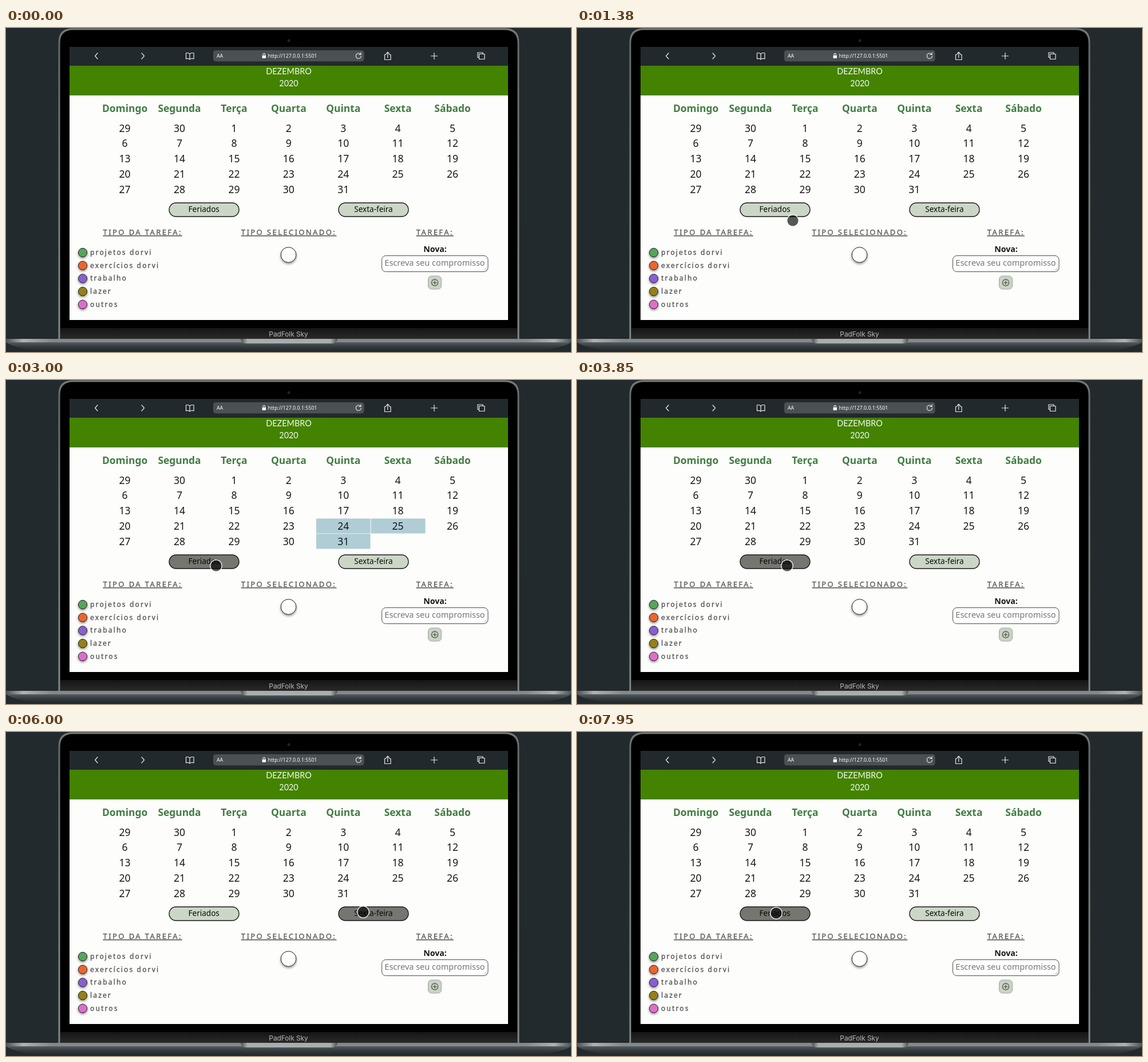
These frames come from a looping animation (987x567 px, 7.99 s). An HTML page:

```html
<!DOCTYPE html>
<html lang="pt">
<head>
<meta charset="utf-8">
<title>Calendário</title>
<style>
  html, body { margin: 0; width: 100%; height: 100%; overflow: hidden; background: #222a2d; }
  svg { display: block; width: 100%; height: 100%; font-family: "Noto Sans", "Open Sans", sans-serif; }
  text { fill: #171717; text-anchor: middle; }
  .month { font: 14.4px Lato, sans-serif; fill: #f5faef; }
  .weekday { font-size: 17.4px; font-weight: 700; fill: #417d42; }
  .day { font-size: 17.5px; }
  .label { font-size: 13.5px; fill: #080808; }
  .heading { font-size: 13px; letter-spacing: 2.4px; fill: #5c6257; stroke: #5c6257; stroke-width: .35; text-decoration: underline; }
  .task { font-size: 12px; letter-spacing: 2.15px; fill: #505050; stroke: #505050; stroke-width: .3; text-anchor: start; }
  .url { font-size: 8.8px; fill: #fff; text-anchor: start; }
  .icons { fill: none; stroke: #e8eaea; stroke-width: 1.2; stroke-linecap: round; stroke-linejoin: round; }
  .pill { stroke: #181a17; stroke-width: 1.4; }
  .shadow { filter: drop-shadow(0 2px 2px #0007); }
</style>
</head>
<body>
<svg viewBox="0 0 987 567" preserveAspectRatio="none">
  <defs>
    <linearGradient id="rim" x2="0" y2="1">
      <stop stop-color="#777b7c"/><stop offset=".05" stop-color="#666a6b"/>
      <stop offset="1" stop-color="#85898a"/>
    </linearGradient>
    <linearGradient id="chin" x2="0" y2="1">
      <stop stop-color="#151515"/><stop offset="1" stop-color="#2b2b2b"/>
    </linearGradient>
    <linearGradient id="base">
      <stop stop-color="#4d5355"/><stop offset=".03" stop-color="#aeb2b3"/>
      <stop offset=".08" stop-color="#83898b"/><stop offset=".92" stop-color="#83898b"/>
      <stop offset=".97" stop-color="#aeb2b3"/><stop offset="1" stop-color="#4d5355"/>
    </linearGradient>
    <linearGradient id="under" x2="0" y2="1">
      <stop stop-color="#555c5f"/><stop offset=".45" stop-color="#343c40"/><stop offset="1" stop-color="#20282b"/>
    </linearGradient>
    <linearGradient id="notch">
      <stop stop-color="#4a4d4f"/><stop offset=".07" stop-color="#a9adaf"/>
      <stop offset=".93" stop-color="#a9adaf"/><stop offset="1" stop-color="#4a4d4f"/>
    </linearGradient>
  </defs>

  <!-- Laptop -->
  <rect width="987" height="567" fill="#222a2d"/>
  <path d="M91.5 546V25Q91.5 .5 116 .5H872Q896.5 .5 896.5 25V546Z" fill="url(#rim)"/>
  <path d="M94.5 546V26Q94.5 3.5 117 3.5H871Q893.5 3.5 893.5 26V546Z"/>
  <rect x="95" y="525" width="798" height="20" fill="url(#chin)"/>
  <circle cx="494" cy="22" r="2.5" fill="#202225"/>
  <text x="493.5" y="539.5" font-size="11.8" style="font-family:Inter,sans-serif;fill:#b9b9b9">PadFolk Sky</text>
  <path d="M0 550H987Q972 561 920 566H67Q15 561 0 550Z" fill="url(#under)"/>
  <rect y="544" width="987" height="6" fill="url(#base)"/>
  <path d="M410 544H579Q578 552 570 552H419Q411 552 410 544Z" fill="url(#notch)"/>

  <!-- Browser bar -->
  <rect x="111" y="33" width="766" height="478" fill="#fdfdfb"/>
  <rect x="111" y="33" width="766" height="33" fill="#22292d"/>
  <rect x="362" y="39" width="263.5" height="19.5" rx="4.5" fill="#4b5053"/>
  <text class="url" x="368" y="52">AA</text>
  <text class="url" x="457.5" y="52">http://127.0.0.1:5501</text>
  <rect x="447.5" y="48" width="6.5" height="5" rx="1" fill="#fff"/>
  <g class="icons">
    <path d="M449 48V46.5a1.8 1.8 0 0 1 3.6 0V48"/>
    <path d="M160 44L155.5 49L160 54M237 44L241.5 49L237 54"/>
    <path d="M321 45.5Q318 42.5 314.5 44V54Q318 52.5 321 55Q324 52.5 328 54V44Q324 42.5 321 45.5V55"/>
    <path d="M619.5 46A4.6 4.6 0 1 0 620.5 49M620 43V46.5H616.5"/>
    <path d="M664 46.5H661.5V55.5H672V46.5H669.5M666.7 52V42.5M664 45L666.7 42.3L669.5 45"/>
    <path d="M742.5 49H753.5M748 43.5V54.5"/>
    <path d="M826 51.5H824V43H833V45M826.5 45.5H836V54.5H826.5Z"/>
  </g>

  <!-- Page -->
  <rect x="111" y="66" width="766" height="52" fill="#438300"/>
  <text class="month" x="494" y="80.5">DEZEMBRO</text>
  <text class="month" x="494" y="102">2020</text>
  <path id="holidays" fill="#b0cdd5"
    d="M542 242.5H636.5V268.5H542ZM637.5 242.5H732.5V268.5H637.5ZM542 269.3H636.5V295.5H542Z"/>
  <g id="calendar"></g>
  <rect id="holidayButton" class="pill" x="285" y="306" width="122" height="24" rx="12"/>
  <rect id="fridayButton" class="pill" x="581" y="306" width="122" height="24" rx="12"/>
  <text class="label" x="345.7" y="322">Feriados</text>
  <text class="label" x="642" y="322">Sexta-feira</text>

  <text class="heading" x="238.7" y="362">TIPO DA TAREFA:</text>
  <text class="heading" x="494" y="362">TIPO SELECIONADO:</text>
  <text class="heading" x="749.3" y="362">TAREFA:</text>
  <g id="tasks"></g>
  <circle class="shadow" cx="493.5" cy="397" r="13.3" fill="#fff" stroke="#222"/>
  <text x="749.5" y="392" font-size="14.2" font-weight="700">Nova:</text>
  <rect x="656.5" y="398.5" width="185.5" height="28" rx="7" fill="#fff" stroke="#4b4b4b"/>
  <text x="749" y="415.5" font-size="14.5" style="fill:#757575">Escreva seu compromisso</text>
  <path d="M835 424.5L840 419.5M838 424.5L840 422.5" stroke="#888" stroke-width=".8"/>
  <rect x="737.5" y="434" width="23" height="23" rx="6" fill="#cad3c5" stroke="#9da698"/>
  <g fill="none" stroke="#50564d" stroke-width="1.3">
    <circle cx="749" cy="445.6" r="5.6"/>
    <path d="M745.7 445.6H752.3M749 442.3V448.9"/>
  </g>
  <circle id="cursor" r="10.2" fill="#000" fill-opacity=".66" stroke="#fff" stroke-opacity=".82" stroke-width="1.5"/>
</svg>
<script>
const LOOP = 7990;
const byId = id => document.getElementById(id);

function add(parent, tag, attributes, content = '') {
  const node = document.createElementNS('http://www.w3.org/2000/svg', tag);
  for (const name in attributes) node.setAttribute(name, attributes[name]);
  node.textContent = content;
  parent.append(node);
  return node;
}

const columnX = column => 207.6 + 95.4 * column;
['Domingo', 'Segunda', 'Terça', 'Quarta', 'Quinta', 'Sexta', 'Sábado'].forEach((name, i) =>
  add(byId('calendar'), 'text', { class: 'weekday', x: columnX(i), y: 147 }, name));

const fridays = [];
for (let i = 0; i < 33; i++) {
  const day = i < 2 ? 29 + i : i - 1;
  const cell = add(byId('calendar'), 'text',
    { class: 'day', x: columnX(i % 7), y: 181.5 + 26.8 * Math.floor(i / 7) }, day);
  if (i % 7 === 5) fridays.push({ cell, day });
}

[['projetos dorvi', '#55a65c'], ['exercícios dorvi', '#e9672e'], ['trabalho', '#895fd0'],
 ['lazer', '#94801b'], ['outros', '#df6dd0']].forEach(([name, fill], i) => {
  const y = 393 + 22.7 * i;
  add(byId('tasks'), 'circle', { class: 'shadow', cx: 134, cy: y, r: 7.6, fill, stroke: '#222' });
  add(byId('tasks'), 'text', { class: 'task', x: 147, y: y + 4 }, name);
});

// Cursor stops: time, x, y
const stops = [
  [1040, 412, 392], [1380, 377, 337], [1620, 367, 325], [3950, 367, 325],
  [4400, 624, 315], [6550, 624, 315], [7150, 348, 317], [LOOP, 348, 317]
];

function cursorAt(time) {
  const next = stops.findIndex(stop => time < stop[0]);
  if (next < 1) return null;
  const [t0, x0, y0] = stops[next - 1], [t1, x1, y1] = stops[next];
  const p = (time - t0) / (t1 - t0), eased = p * p * (3 - 2 * p);
  return { x: x0 + (x1 - x0) * eased, y: y0 + (y1 - y0) * eased };
}

function paintButton(id, left, cursor) {
  const hovered = cursor && Math.abs(cursor.x - left - 61) < 61 && Math.abs(cursor.y - 318) < 12;
  byId(id).setAttribute('fill', hovered ? '#747670' : '#ccd6c7');
}

function draw() {
  const time = performance.now() % LOOP;
  const cursor = cursorAt(time);
  byId('cursor').setAttribute('visibility', cursor ? 'visible' : 'hidden');
  if (cursor) byId('cursor').setAttribute('transform', `translate(${cursor.x} ${cursor.y})`);
  paintButton('holidayButton', 285, cursor);
  paintButton('fridayButton', 581, cursor);
  byId('holidays').setAttribute('visibility', time >= 2250 && time < 3420 ? 'visible' : 'hidden');
  const party = time >= 4640 && time < 5600;
  for (const { cell, day } of fridays) cell.textContent = party ? 'SEXTOU!' : day;
  requestAnimationFrame(draw);
}
draw();
</script>
</body>
</html>
```
